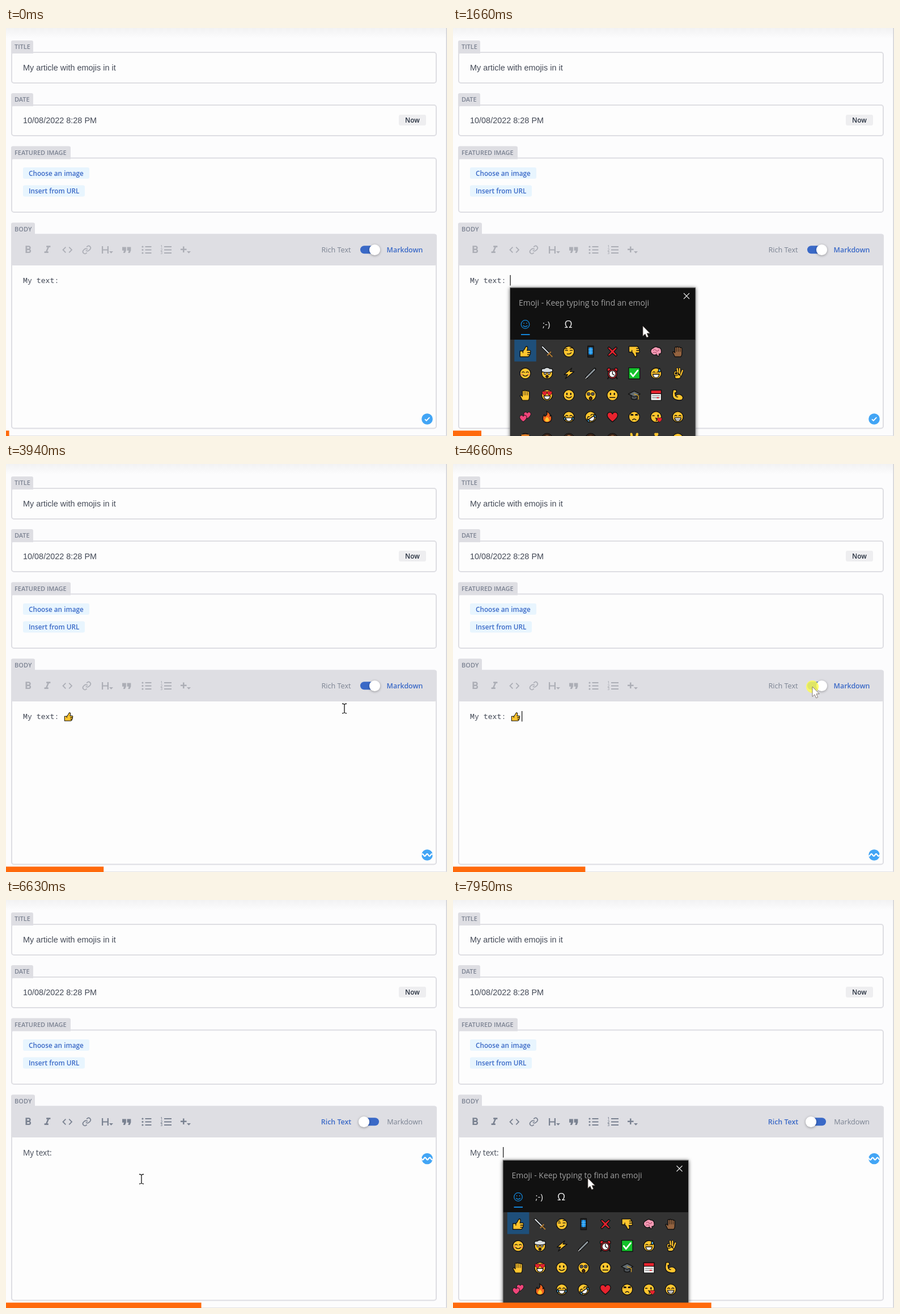
Animation of 778 by 720 pixels, one loop 8000 ms. Source, as an HTML page:

```html
<!DOCTYPE html>
<html lang="en">
<head>
<meta charset="utf-8">
<title>Emoji entry in an article editor</title>
<style>
html, body { margin: 0; width: 100%; height: 100%; overflow: hidden; background: #fcfcfd; }
svg { display: block; width: 778px; height: 720px; }
text { font-family: "Open Sans", "Noto Sans", sans-serif; white-space: pre; }
.label { font-size: 11px; font-weight: 600; fill: #7c8392; }
.input { font: 14.45px "Liberation Sans", Arial, sans-serif; fill: #444a57; }
.button { font-size: 11.75px; font-weight: 600; fill: #3a69c7; }
.mono { font: 13.2px "Noto Sans Mono", monospace; fill: #444a57; }
.body { font-size: 13.7px; fill: #444a57; }
.mode { font-size: 12.6px; fill: #7a8291; text-anchor: middle; }
.mode.on { font-size: 12.4px; font-weight: 600; fill: #3a69c7; }
#tools { color: #acaeb6; }
.rich #tools { color: #7a8291; }
.rich .md, svg:not(.rich) .rt { display: none; }
</style>
</head>
<body>
<svg id="stage" viewBox="0 0 778 720"></svg>
<script>
const stage = document.getElementById('stage');
const GREY = '#dedee3', INK = '#111', YELLOW = '#ffc52e', RED = '#e8232e';

// ---- drawing helpers ----
const rect = (x, y, w, h, fill, r = 0, more = '') =>
  `<rect x="${x}" y="${y}" width="${w}" height="${h}" rx="${r}" fill="${fill}" ${more}/>`;
const text = (x, y, cls, s, more = '') => `<text x="${x}" y="${y}" class="${cls}" ${more}>${s}</text>`;
const shape = (d, fill) => `<path d="${d}" fill="${fill}"/>`;
const line = (d, color = INK, w = 1.3) => `<path d="${d}" fill="none" stroke="${color}" stroke-width="${w}"/>`;
const disc = (x, y, r, fill, more = '') => `<circle cx="${x}" cy="${y}" r="${r}" fill="${fill}" ${more}/>`;
const at = (x, y, s, inner, more = '') => `<g transform="translate(${x} ${y}) scale(${s})" ${more}>${inner}</g>`;

const field = (name, labelW, y, h) =>
  rect(10, y, 749, h, '#fdfdfd', 4, `stroke="${GREY}" stroke-width="2"`) +
  `<path d="M9 ${y + 2}v-20q0-3 3-3h${labelW - 6}q3 0 3 3v20z" fill="${GREY}"/>` +
  text(15, y - 6, 'label', name);

// ---- toolbar ----
const icon = (x, d) => at(x - 10.8, 380.7, .9, `<path d="${d}"/>`);
const drop = x => `<path d="M${x} 394h7l-3.5 3.7z"/>`;
const tools = `<g id="tools" fill="currentColor">` +
  icon(39, 'M15.6 10.8c1-.7 1.65-1.8 1.65-2.8 0-2.26-1.75-4-4-4H7v14h7c2.1 0 3.75-1.7 3.75-3.8 0-1.5-.86-2.8-2.15-3.4zM10 6.5h3a1.5 1.5 0 0 1 0 3h-3zm3.5 9H10v-3h3.5a1.5 1.5 0 0 1 0 3z') +
  icon(73, 'M10 4v3h2.2l-3.4 8H6v3h8v-3h-2.2l3.4-8H18V4z') +
  icon(108.3, 'M9.4 16.6 4.8 12l4.6-4.6L8 6l-6 6 6 6zm5.2 0 4.6-4.6-4.6-4.6L16 6l6 6-6 6z') +
  at(133.8, 382.8, .72, line('M10 13a5 5 0 0 0 7.5.5l3-3a5 5 0 0 0-7-7l-1.8 1.7M14 11a5 5 0 0 0-7.5-.5l-3 3a5 5 0 0 0 7 7l1.8-1.7', 'currentColor', 2.3)) +
  `<path d="M169 385h2.2v5.4h7.6V385h2.2v13h-2.2v-5.5h-7.6v5.5H169z"/>` + drop(182) +
  icon(212.7, 'M5.5 18h3.4l2.2-4.5V6.5H3.5v7h3.4zm9.5 0h3.4l2.1-4.5V6.5H13v7h3.4z') +
  [0, 1, 2].map(i => {
    const y = 386 + i * 5.5;
    return disc(241, y, 1.6, 'currentColor') + rect(245.5, y - 1, 11, 2, 'currentColor') +
      rect(279, y - 1, 13, 2, 'currentColor') +
      text(272.5, y + 2.4, '', i + 1, 'font-size="6.4" font-weight="600"');
  }).join('') +
  `<path d="M312 385.5h2.5v4h4v2.5h-4v4H312v-4h-4v-2.5h4z"/>` + drop(319) + '</g>';

const toggle = (cls, knob, left, right) => `<g class="${cls}">` +
  text(582.5, 396, 'mode ' + left, 'Rich Text') + text(703.5, 396, 'mode ' + right, 'Markdown') +
  rect(625, 384.3, 33, 14, '#3a69c7', 7) +
  disc(knob, 391.5, 9.6, '#fff', 'style="filter:drop-shadow(0 1px 2px #0005)"') + '</g>';

// ---- emoji, each about 20 units wide around the origin ----
const EYES = line('M-3.3-3v2M3.3-3v2', INK, 2.2);
const ARCS = line('M-5.5-1.5q2-2.5 4 0M1.5-1.5q2-2.5 4 0');
const SMILE = line('M-4.5 2.5q4.5 4.5 9 0');
const GRIN = shape('M-5.5 1.5h11q-.8 6-5.5 6t-5.5-6z', '#fff');
const face = (...parts) => disc(0, 0, 9.2, YELLOW) + parts.join('');
const HEART = 'M0 8.5Q-9 2-9-3.2Q-8.5-8-4-8-1-8 0-5 1-8 4-8 8.500-8 9-3.200 9 2 0 8.500Z';
const heart = (x, y, s, c = RED) => at(x, y, s, shape(HEART, c));
const tear = x => shape(`M${x}-1q3 6 0 6.500-3-.5 0-6.500z`, '#4bb8f2');
const THUMB = shape('M-9-1h5C0-4-.5-8.500 2-9 5-9 4-4 3-2H8q2 1.500.5 3.500 1 2.500-.8 4Q7 9 4 9H-9z', YELLOW) + line('M4 1.700h4M4 5.300h3.500M-4-1v3');
const hand = c => shape('M-5 9q-2-4-4-8 2-2 4 1v-9q1.500-2 3 0 1-3 3 0 2-2 3 .5 2-1 3 1V4q0 3-2 5z', c) + line('M-2-6v6M1-6v6M4-5v5', INK, .8);

const emoji = [
  THUMB,
  line('M-8-8 6 6', '#111', 4) + line('M-8-8 4 4', '#dde3e8', 2) + line('M1 6 6 1M4 4l4.500 4.500', '#a87532', 2.200),
  face(line('M-6-2h4M2-2h4M-6-5h3M2-6q2-1 4 0'), line('M-3 4q5 1 7-2')),
  shape('M-5-9.500H5v19H-5z', '#222') + rect(-3.5, -7, 7, 12, '#168ee5', 0, 'stroke="none"') + line('M0-7V5M-3.500-3h7M-3.500 1h7', '#7fd0ff', .7),
  shape('M-8-6-6-8 0-2.800 6-8 8-6 2.800 0 8 6 6 8 0 2.800-6 8-8 6-2.800 0z', RED),
  `<g transform="scale(1 -1)">${THUMB}</g>`,
  shape('M-9 1Q-10-4-5-6-1-10 3-7 9-7 9-1 10 4 5 4 6 8 3 8L1 5Q-5 8-9 1z', '#f59bb5') + line('M-5-2q3-3 5 0t5-1M-5 2q4-2 6 1', '#a84867', 1),
  hand('#94633f'),

  face(ARCS, SMILE, disc(-6, 2, 1.7, '#f58a4c', 'stroke="none"'), disc(6, 2, 1.7, '#f58a4c', 'stroke="none"')),
  face(shape('M-9-3Q-11-9-5-8 0-12 5-8 11-9 9-3q-9 3-18 0z', '#d8dde0'), disc(-3.3, 0, 1.8, '#fff'), disc(3.3, 0, 1.8, '#fff'), disc(0, 5.3, 2, '#4a2716')),
  shape('M5-9-8 2h6l-4 7L9-3H2z', YELLOW),
  line('M-7 7 7-7', '#111', 5) + line('M-6 6 6.500-6.500', '#8f989e', 2.600) + line('M-8.500 8.500-6 6', '#ddd', 1.200),
  line('M-6 6-8 9M6 6l2 3', INK, 2) + disc(-6, -6, 3, RED) + disc(6, -6, 3, RED) + disc(0, 1, 8, RED) + disc(0, 1, 5.700, '#fff') + line('M0-3v4l3 2'),
  rect(-9.5, -9.5, 19, 19, '#13c22b') + line('M-6 0-2 5 6-5', '#fff', 2.600),
  face(ARCS, GRIN, shape('M6-9q4 6 0 6.500-4-.5 0-6.500z', '#4bb8f2')),
  shape('M-4 9Q-7 4-3 0L1 2 5 4Q6 8 1 9z', YELLOW) + disc(-3, 0, 4, YELLOW) + disc(-3, 0, 1.5, '#333') + line('M0-2-1-8M3 0 3-8M5 3 8-5', INK, 4) + line('M0-2-1-8M3 0 3-8M5 3 8-5', YELLOW, 2.200),

  hand(YELLOW),
  face(heart(-4.3, -3, .48), heart(4.3, -3, .48), GRIN),
  face(EYES, SMILE),
  face(disc(-3.5, -2, 2.4, '#fff'), disc(3.5, -2, 2.4, '#fff'), disc(-3.5, -2, .6, INK), disc(3.5, -2, .6, INK), shape('M-2.500 5q2.500-5 5 0 0 3-2.500 3t-2.500-3z', '#4a2716')),
  face(EYES, line('M-4.500 4h9')),
  shape('M-5 0V6q5 3 10 0V0z', '#4c5257') + shape('M-10-2 0-7 10-2 0 3z', '#626b70') + line('M0-2 7 1V7', '#d7a52b', 1.300),
  rect(-9, -8.500, 18, 17.500, '#fff') + rect(-9, -8.500, 18, 6, RED) + line('M-6 1H6M-6 4.500H6', '#999', 1.800) + line('M2 4.500h2', RED, 2),
  shape('M-8-9h5l1 4-3 1 1 5Q1-3 6 0 11 4 7 8 1 10-5 7-10 4-9-3z', YELLOW) + line('M-4 1q2 3 4 2'),

  heart(3.5, -3, .68, '#f0457a') + heart(-3.5, 2.5, .68, '#f0457a'),
  shape('M-1-10Q7-5 5-1L7-3Q10 9 0 9.500-9 9-7 0-6-3-5-4l1 3Q2-4-1-10z', '#f4631e') + `<path d="M0 0Q5 4 3 7.500 0 9-3 7.500-5 4 0 0z" fill="${YELLOW}" stroke="none"/>`,
  face(ARCS, GRIN, tear(-7), tear(7)),
  `<g transform="rotate(-35)">${face(ARCS, GRIN, tear(-7), tear(7))}</g>`,
  shape(HEART, RED),
  face(line('M-6-3h4M2-3h4M-6-5l4 1M6-5 2-4'), line('M-3 5q3-3 6 0')),
  face(line('M-6-2h3'), line('M3.500-3v2', INK, 2.200), line('M-1 2q4 0 1 2 3 1 0 3'), heart(6, 5, .48)),
  face(ARCS, GRIN, line('M-4.500 4.500h9', INK, .8)),

  ...['#8a4a22', '#94633f', '#c98a58', '#5b3a2a', '#94633f'].map((c, i) => disc(0, 0, 9, c) + (i ? line('M-5-5q5-5 10 0', '#3a2418', 2.500) : line('M-6-6 6-6', '#f28a2a', 2))),
  line('M-3 2-5-8M3 2 5-8', YELLOW, 4) + disc(0, 4, 5, YELLOW),
  line('M-3 2 2-8M3 2-1-8', YELLOW, 4) + disc(0, 4, 5, YELLOW),
  face(EYES)
];
const EMOJI_STYLE = `stroke="${INK}" stroke-width="1.3" stroke-linecap="round" stroke-linejoin="round"`;
const PITCH = 38.45;
const grid = emoji.map((e, i) => at(127.5 + i % 8 * PITCH, 571 + (i >> 3) * PITCH, 1.03, e, EMOJI_STYLE)).join('');

const panel = `<g id="panel">` +
  rect(100.7, 458, 327, 290, '#fff', 0, 'stroke="#777" stroke-width=".8" style="filter:drop-shadow(0 1px 3px #0009)"') +
  '<g id="content">' + rect(101, 458.500, 326.500, 92, '#111') + rect(101, 550, 326.500, 190, '#333') +
  text(116, 490, '', 'Emoji - Keep typing to find an emoji', 'font-size="13.93" fill="#a0a0a0"') +
  line('M407 468l10 10M417 468l-10 10', '#e8e8e8', 1.100) +
  disc(127.500, 523, 7.300, 'none', 'stroke="#1385d8" stroke-width="1.3"') +
  line('M125 520v2M130 520v2M123.500 525q4 4 8 0', '#1385d8', 1.300) +
  rect(120, 540, 15.500, 2, '#1385d8') +
  text(158, 528, '', ';-)', 'font-size="15" fill="#eee"') +
  text(196.500, 529, '', 'Ω', 'font-size="18" fill="#eee"') +
  rect(0, 0, 38.500, 38.500, '#1e4f7a', 0, 'id="cell"') + grid +
  rect(424, 565, 2, 82, '#8a8a8a', 0, 'id="scrollbar"') + '</g></g>';

// ---- whole scene ----
stage.innerHTML =
  `<defs><linearGradient id="fade" x2="0" y2="1"><stop stop-color="#f2f2f3"/><stop offset="1" stop-color="#fcfcfd"/></linearGradient>
  <clipPath id="round"><circle r="10"/></clipPath></defs>` +
  rect(0, 0, 778, 720, '#fcfcfd') + rect(0, 0, 778, 18, 'url(#fade)') +
  rect(776.500, 0, 1.500, 720, '#d0d0d4') + rect(0, 719, 778, 1, '#e3e3e6') +
  field('TITLE', 39, 43, 54) + text(30, 75, 'input', 'My article with emojis in it') +
  field('DATE', 39, 136, 54) + text(30, 168, 'input', '10/08/2022 8:28 PM') +
  rect(693, 153, 48, 19, '#eeeef0', 3) + text(704, 167.300, 'button', 'Now', 'style="fill:#27303f"') +
  field('FEATURED IMAGE', 105, 229.500, 95.500) +
  rect(30, 246, 117, 20, '#e8f5fe', 3) + text(40, 260.500, 'button', 'Choose an image') +
  rect(30, 277.500, 109, 20, '#e8f5fe', 3) + text(40, 292, 'button', 'Insert from URL') +
  field('BODY', 42, 364.500, 342) + rect(9, 363.500, 751, 55.500, GREY, 4) + tools +
  toggle('md', 650.500, '', 'on') + toggle('rt', 631.500, 'on', '') +
  text(30, 450, 'mono md', 'My text:') + text(30, 451, 'body rt', 'My text:') +
  at(110.500, 446, .8, THUMB, `id="typed" ${EMOJI_STYLE}`) +
  rect(0, 436, 1.300, 18.500, '#222', 0, 'id="caret"') +
  `<g id="badge"><circle r="9.8" fill="#42a5f5"/>${line('M-4 .3-1.300 3 4.300-2.800', '#fff', 1.800).replace('<path', '<path id="tick"')}
  <path id="wave" fill="none" stroke="#fff" stroke-width="2.2" clip-path="url(#round)"/></g>` +
  panel +
  `<g id="pointer"><circle id="press" r="11" fill="#fdfb55" fill-opacity=".85"/>
  <path id="arrow" d="M0 0V17.500L4 13.800 6.700 20 9.600 18.800 7 12.700H12.300Z" fill="#fff" stroke="#6b5f58" stroke-width=".8"/>
  <path id="beam" d="M-3-7Q0-7 1-5.500 2-7 5-7M1-5.500V8.500M-3 10Q0 10 1 8.500 2 10 5 10" fill="none" stroke="#111" stroke-width="1.3"/></g>` +
  rect(0, 710.500, 0, 9.500, '#ff6a0c', 0, 'id="bar"');

// ---- timing ----
const LOOP = 8000;
// bursts of screen updates: start, end, count
const steps = [
  [0, 0, 1], [100, 170, 2], [440, 520, 2], [700, 700, 1], [1050, 1050, 1], [1590, 1660, 2], [2120, 2640, 8],
  [2900, 2900, 1], [3100, 3870, 12], [3940, 4720, 13], [4790, 4860, 2], [5120, 5260, 3], [5460, 5460, 1],
  [5660, 5660, 1], [5870, 6630, 12], [6700, 7480, 13], [7550, 7950, 7]
].flatMap(([a, b, n]) => Array.from({ length: n }, (_, i) => Math.round(a + (b - a) * i / Math.max(1, n - 1))));

const path = [
  [100, 483, 579], [170, 335, 526], [2120, 335, 526], [2640, 126, 582], [3170, 126, 582], [3520, 411, 473],
  [3730, 411, 473], [3940, 596, 430], [4330, 634, 393], [5040, 634, 393], [5260, 426, 549], [5870, 426, 549],
  [6230, 203, 491], [6560, 238, 491], [LOOP, 238, 491]
];
const presses = [[440, 700], [2900, 3100], [3580, 3730], [4580, 4790], [5460, 5660]];
const blinks = [[520, 1050], [1590, 2120], [2640, 3100], [3170, 3700], [4230, 4760], [5660, 6190], [6720, 7250], [7780, LOOP]];

const within = (t, spans) => spans.some(([a, b]) => t >= a && t < b);
const $ = id => document.getElementById(id);
const show = (id, on) => { $(id).style.display = on ? '' : 'none'; };
const move = (id, x, y) => $(id).setAttribute('transform', `translate(${x} ${y})`);

function pointerAt(t) {
  const i = Math.max(1, path.findIndex(k => k[0] > t));
  const [a, x, y] = path[i - 1], [b, u, v] = path[i];
  const f = Math.max(0, (t - a) / (b - a));
  return [x + (u - x) * f, y + (v - y) * f];
}

function draw(now) {
  const count = steps.filter(s => s <= now).length;
  const t = steps[count - 1];
  const rich = t >= 4790;
  stage.classList.toggle('rich', rich);
  $('bar').setAttribute('width', count * 778 / 140);

  show('typed', t >= 3170 && !rich);
  show('caret', within(t, blinks));
  $('caret').setAttribute('x', rich ? 88 : t >= 3170 ? 121 : 100.500);

  const checking = t >= 3240;
  show('badge', t < 4860 || t >= 5870);
  move('badge', 743, t >= 5870 ? 456.500 : 690);
  show('tick', !checking);
  show('wave', checking);
  const pts = Array.from({ length: 23 }, (_, i) => `${i - 11} ${(2 * Math.sin(i * .75 + count * .9)).toFixed(2)}`);
  $('wave').setAttribute('d', 'M' + pts.join('L'));

  const open = within(t, [[1590, 3730], [7600, LOOP]]);
  show('panel', open);
  show('content', within(t, [[1650, 3730], [7650, LOOP]]));
  move('panel', rich ? -12.500 : 0, rich ? 1 : 0);

  const [x, y] = pointerAt(t);
  const hovering = t >= 2190 && !rich;
  const col = hovering ? Math.floor((x - 108.300) / PITCH) : 0;
  const row = hovering ? Math.floor((y - 550) / PITCH) : 0;
  show('cell', row >= 0);
  $('cell').setAttribute('x', 108.300 + col * PITCH);
  $('cell').setAttribute('y', 550 + row * PITCH);
  $('cell').setAttribute('fill', hovering ? '#4a4a4a' : '#1e4f7a');
  show('scrollbar', hovering);

  const arrow = open || y < 419;
  show('pointer', t >= 100);
  move('pointer', x, y);
  show('press', within(t, presses));
  show('arrow', arrow);
  show('beam', !arrow);
}

const start = performance.now();
function tick() {
  draw((performance.now() - start) % LOOP);
  requestAnimationFrame(tick);
}
tick();
</script>
</body>
</html>
```
